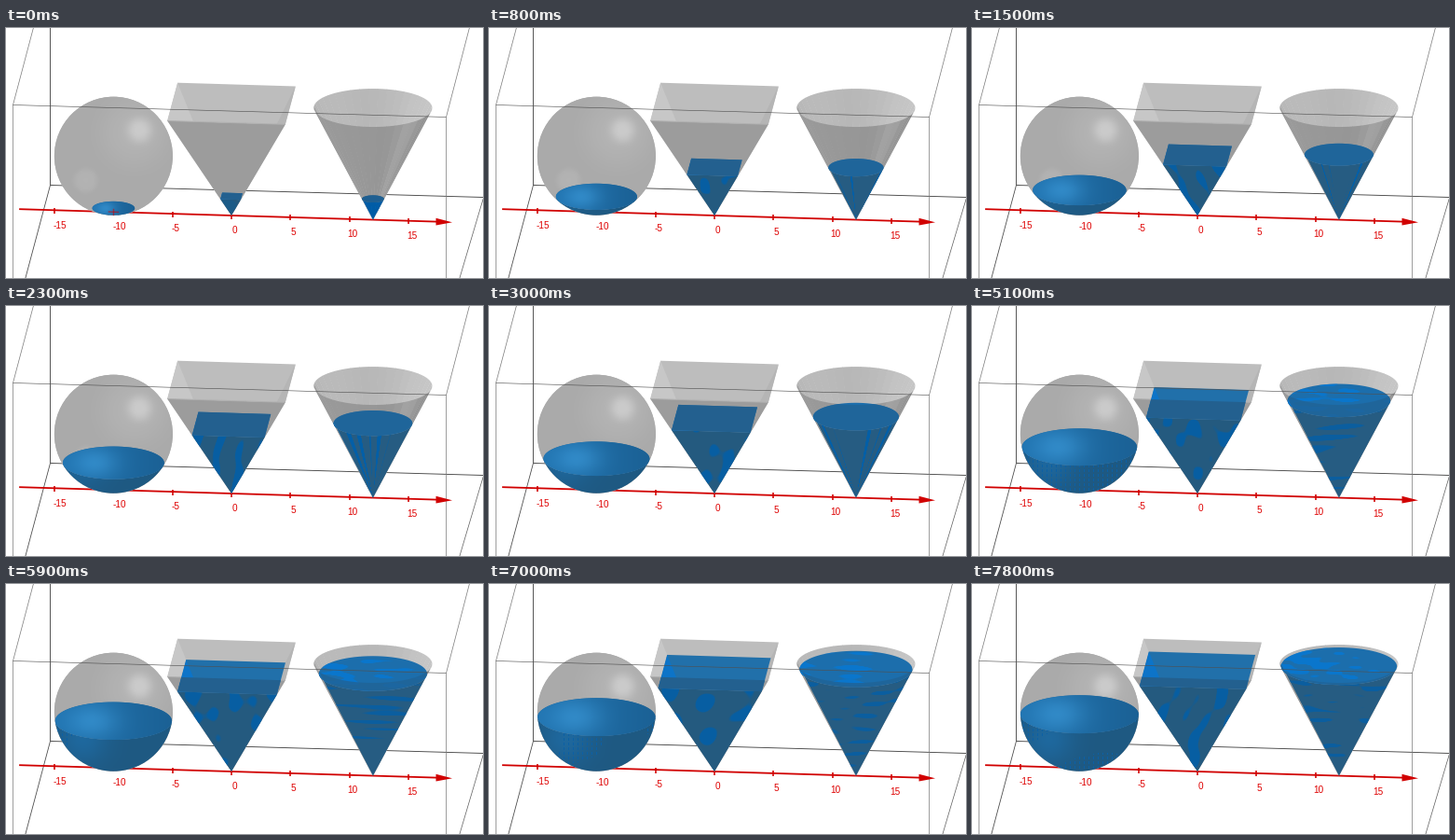
These frames come from a looping animation (512x268 px, 8000 ms). A matplotlib script:

```python
import numpy as np
import matplotlib.pyplot as plt
from matplotlib.animation import FuncAnimation
from matplotlib.patches import Circle, Polygon

W, H = 512, 268
TICKS, INTERVAL = 80, 100
# Ticks on which the liquid pauses
PAUSES = (2, 7, 12, 17, 21, 25, 27, 31, 35, 39, 43, 49, 54, 60, 65, 71, 75, 79)
R = 5
RED = (0.82, 0, 0)
BRIGHT = (0, 96, 172)

fig = plt.figure(figsize=(W / 100, H / 100), dpi=100, facecolor="white")
ax = fig.add_axes([0, 0, 1, 1])
ax.set_xlim(-0.5, W - 0.5)
ax.set_ylim(H - 0.5, -0.5)
ax.axis("off")


def proj(x, y, z):
    """Scene coordinates to pixels; y points away from the viewer."""
    return np.stack(np.broadcast_arrays(
        241.5 + 12.66 * x + 1.1 * y,
        200.5 + 0.38 * x - 4.08 * y - 12 * z), axis=-1)


def rgb(*c):
    return tuple(np.array(c) / 255)


def grey(v):
    return rgb(v, v, v)


def circle(cx, radius, z, start=0, stop=360, count=73):
    a = np.radians(np.linspace(start, stop, count))
    return proj(cx + radius * np.cos(a), radius * np.sin(a), z)


def square(half, z):
    """Back left, back right, front right, front left."""
    return proj(half * np.array([-1, 1, 1, -1]),
                half * np.array([1, 1, -1, -1]), z)


live = []


def poly(points, color, z=None, clip=None, alpha=1.0):
    p = Polygon(points, closed=True, facecolor=color, edgecolor="none",
                linewidth=0, alpha=alpha)
    ax.add_patch(p)
    if z is None:
        z = 10 + len(live)
        live.append(p)
    p.set_zorder(z)
    if clip is not None:
        p.set_clip_path(clip)
    return p


def image(data, box, clip, z=None):
    x0, x1, y0, y1 = box
    im = ax.imshow(np.clip(data, 0, 1), aspect="auto", origin="upper",
                   interpolation="nearest",
                   extent=(x0 - 0.5, x1 - 0.5, y1 - 0.5, y0 - 0.5))
    if z is None:
        z = 10 + len(live)
        live.append(im)
    im.set_zorder(z)
    im.set_clip_path(clip)


def grid(box):
    x0, x1, y0, y1 = box
    return np.meshgrid(np.arange(x0, x1), np.arange(y0, y1))


def rgba(shape, color, alpha):
    out = np.empty(shape + (4,))
    out[..., :3] = np.asarray(color) / 255
    out[..., 3] = alpha
    return out


def noise(u, v, seed):
    """Smooth random field, roughly within -1..1."""
    rng = np.random.RandomState(seed)
    total = np.zeros(u.shape)
    for _ in range(6):
        a, b = rng.uniform(-1, 1, 2)
        total += np.sin(a * u + b * v + rng.uniform(0, 6.28))
    return total / 3


def speckle(box, clip, field, level, color=BRIGHT, strength=0.9):
    alpha = strength * np.clip((field - level) * 5, 0, 1)
    image(rgba(field.shape, color, alpha), box, clip)


# Bounding box and axis
def line(points, color, width, z):
    x, y = zip(*points)
    ax.plot(x, y, color=color, lw=width * 0.72, zorder=z,
            solid_capstyle="butt")


line([(47, -1), (47, 168), (512, 181)], grey(70), 0.9, 1)
line([(47, 168), (20, 269)], grey(70), 0.8, 1)
line([(512, 181.5), (486, 269)], grey(90), 0.7, 1)
line([(29, -1), (7, 82), (7, 269)], grey(120), 0.7, 1)
line([(497, -1), (472, 95), (472, 269)], grey(120), 0.7, 1)
line([(7, 82), (472, 95)], grey(80), 0.6, 900)

line([proj(-18, 0, 0), proj(17.8, 0, 0)], RED, 1.8, 2)
poly([(461, 203.3), (478.5, 207.8), (461, 211)], RED, 2)
for tick in range(-15, 16, 5):
    tx, ty = proj(tick, 0, 0)
    line([(tx, ty - 2.5), (tx, ty + 3.5)], RED, 1.6, 2)
    ax.text(tx + (6 if tick < -5 else 3.5), ty + 16.3, str(tick),
            color=(0.87, 0, 0), fontsize=7.2, family="Liberation Sans",
            ha="center", va="center", zorder=2)

# Sphere
SX, SY = proj(-10, 0, R)
SR = 63.5
SBOX = (50, 181, 72, 203)
gx, gy = grid(SBOX)
ball = Circle((SX, SY), SR, facecolor=grey(170), edgecolor="none", zorder=3)
ax.add_patch(ball)


def spot(x, y, size, power=2):
    return np.exp(-(np.hypot(gx - x, gy - y) / size) ** power)


tone = (170 + 24 * spot(143, 109, 13, 3) + 9 * spot(137, 112, 36, 3)
        + 9 * spot(85, 163, 13, 5))
image(np.repeat(tone[..., None] / 255, 3, axis=2), SBOX, ball, 4)
# Height of the front of the ball, in radii above its centre
up = (SY - gy) / SR
depth = np.sqrt(np.clip(1 - up ** 2 - ((gx - SX) / SR) ** 2, 0, 1))
front_z = 0.947 * up + 0.321 * depth

# Pyramid
PBOX = (170, 313, 55, 203)
px, py = grid(PBOX)
PTIP = proj(0, 0, 0)
base = square(R, 2 * R)
poly(base, grey(189), 3)
poly([base[0], base[3], PTIP], grey(199), 3.1)
poly([base[1], base[2], PTIP], grey(181), 3.1)
pyramid_front = poly([base[3], base[2], PTIP], grey(156), 3.2)
line([base[3], base[2]], grey(176), 1, 3.3)

# Cone
CX = 12
CBOX = (328, 460, 62, 208)
cx, cy = grid(CBOX)
CTIP = proj(CX, 0, 0)
FACETS = 20


def facets(start, stop, shade, z):
    edges = np.linspace(start, stop, FACETS + 1)
    for i, (a, b) in enumerate(zip(edges[:-1], edges[1:])):
        rim = circle(CX, R, 2 * R, a, b + 0.6, 4)
        poly([*rim, CTIP], grey(shade(i / (FACETS - 1))), z)


facets(0, 180, lambda u: 196 - 16 * u + 4 * np.sin(9 * u), 3)
facets(180, 360, lambda u: 156 - 10 * u + 14 * np.exp(-((u - 0.76) / 0.08) ** 2),
       3.1)
cone_front = poly([*circle(CX, R, 2 * R, 180, 360), CTIP], "none", 3.2)

# Liquid volume as a share of the full cone, which equals half the ball
STEPS = (0, 1, 13, 20, 29, 37, 46, 50, 61)
FILLS = (0.0065, 0.0216, 0.213, 0.328, 0.485, 0.625, 0.762, 0.803, 0.938)
DEPTHS = np.linspace(0, 1, 400)


def fill_sphere(fill, n):
    h = np.interp(fill, DEPTHS ** 2 * (3 - DEPTHS) / 2, DEPTHS)
    radius = R * np.sqrt(2 * h - h * h)
    alpha = np.clip((h - 1 - front_z) * SR + 0.5, 0, 1)
    body = rgba(gx.shape, (30, 89, 130), alpha)
    body[..., 1:3] += spot(82, 165, 27)[..., None] * np.array([0.06, 0.11])
    if n > 38:
        dots = (gx % 5 == 0) & (gy % 5 < 3) & (noise(gx / 14, gy / 14, n) > -0.1)
        body[dots, :3] = rgb(12, 96, 165)
    image(body, SBOX, ball)

    top = poly(circle(-10, radius, R * h), rgb(32, 106, 162), clip=ball)
    mx, my = proj(-10, 0, R * h)
    wide = radius * 12.7
    side = (gx - mx) / wide
    glow = np.exp(-((side + 0.35) / 0.45) ** 2 - ((gy - my) / wide / 0.3) ** 2)
    tint = np.stack([30 + 18 * glow - 3 * side, 106 + 28 * glow - 9 * side,
                     162 + 32 * glow - 13 * side], axis=-1) / 255
    image(tint, SBOX, top)
    # The axis still shows through a thin layer
    if n == 0:
        x, y = proj(-10, 0, 0)
        for dx, dy in ((5, 0.2), (0, 3)):
            mark, = ax.plot([x - dx, x + dx], [y - dy, y + dy], color=RED,
                            lw=1, alpha=0.55, zorder=10 + len(live))
            live.append(mark)


def fill_pyramid(fill, n):
    s = (fill * np.pi / 4) ** (1 / 3)
    quad = square(R * s, 2 * R * s)
    body = poly([quad[3], quad[2], PTIP], rgb(36, 90, 127))
    speckle(PBOX, body, noise(px / 3.4, py / 4.5, n + 100), 0.38,
            strength=0.8 if n else 0.2)
    top = poly(quad, rgb(33, 112, 170))
    wall = poly([quad[0], quad[3], PTIP], rgb(8, 118, 208), clip=top)
    wall.set_alpha(0.8)
    poly(quad, rgb(35, 96, 143), clip=pyramid_front)


def fill_cone(fill, n):
    s = fill ** (1 / 3)
    rim = circle(CX, R * s, 2 * R * s)
    front = circle(CX, R * s, 2 * R * s, 180, 360)
    body = poly([*front, CTIP], rgb(38, 92, 130) if n else rgb(0, 92, 166))
    slope = (cx - CTIP[0]) / np.maximum(CTIP[1] - cy, 1)
    if n < 38:
        speckle(CBOX, body, noise(slope * 62, cy / 60, n + 200), 0.6)
    else:
        speckle(CBOX, body, noise(cx / 7, cy / 1.3, n + 200), 0.55,
                strength=0.7)
    top = poly(rim, rgb(28, 110, 172) if n else rgb(24, 84, 128))
    if n > 26:
        mx, my = proj(CX, 0, 2 * R * s)
        side = (cx - mx) / (63.5 * s)
        if n < 38:
            field = noise(slope * 30, cy / 50, n + 300) + 0.2
        else:
            field = noise(cx / 6, cy / 1.3, n + 300) - 0.4 * side
        speckle(CBOX, top, field, 0.35, (4, 122, 216), 0.75)
    poly(rim, rgb(33, 99, 150), clip=cone_front, alpha=0.8)


def draw(tick):
    while live:
        live.pop().remove()
    n = tick - sum(p <= tick for p in PAUSES)
    fill = np.interp(n, STEPS, FILLS)
    fill_sphere(fill, n)
    fill_pyramid(fill, n)
    fill_cone(fill, n)
    return []


anim = FuncAnimation(fig, draw, frames=TICKS, interval=INTERVAL,
                     init_func=lambda: [], repeat=True, repeat_delay=0)
plt.show()
```
